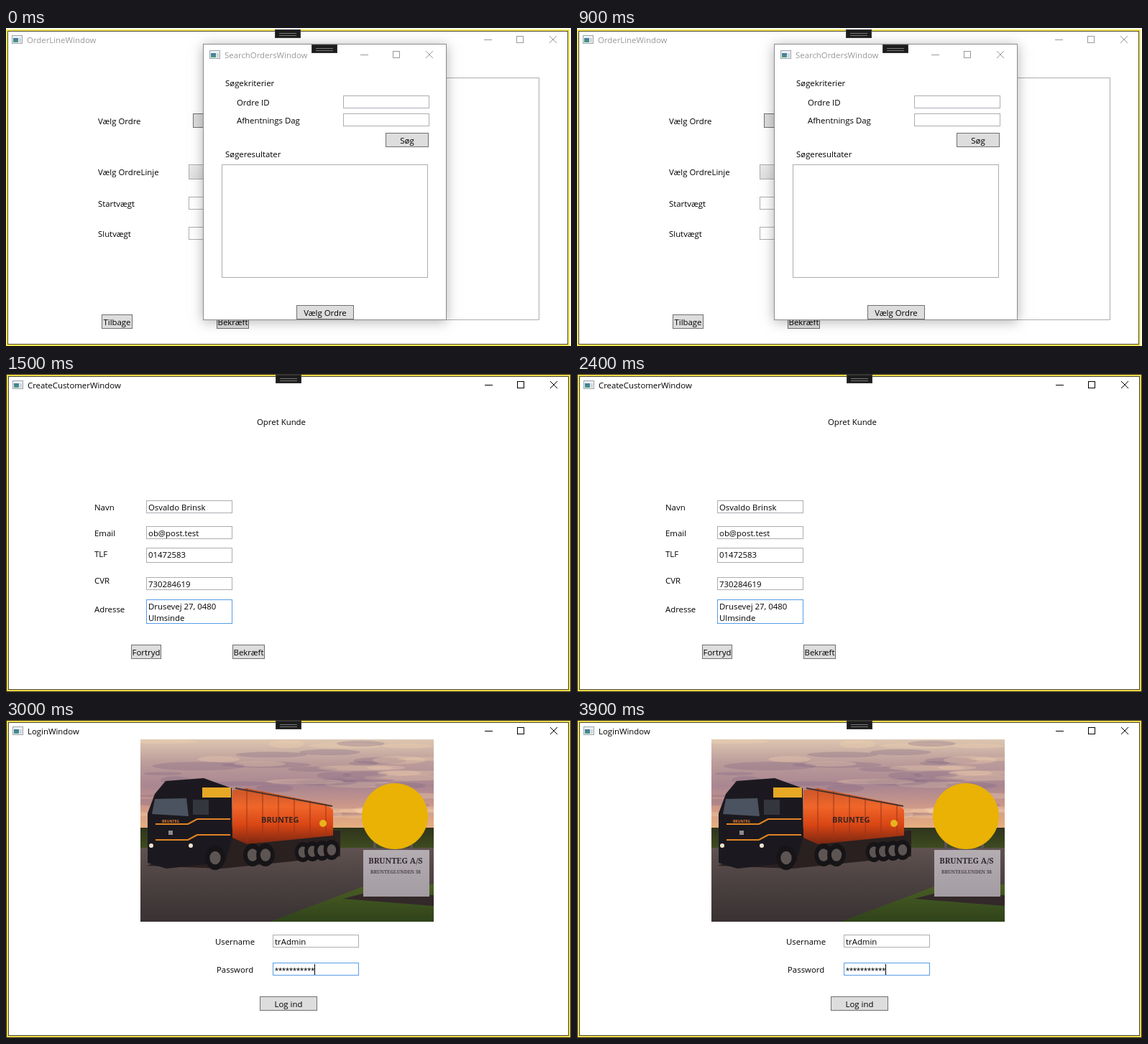
Recreate the animation shown at these times as an HTML page with a canvas. Size 786 by 443 pixels, loop 4.5 s.

```html
<!DOCTYPE html>
<html lang="da">
<head>
<meta charset="utf-8">
<title>Windows</title>
<style>
  html, body { margin: 0; overflow: hidden; background: #fff; }
  canvas { display: block; }
</style>
</head>
<body>
<canvas id="stage" width="786" height="443"></canvas>
<script>
const ctx = document.getElementById('stage').getContext('2d');
const UI_FONT = '11.4px "Open Sans", sans-serif';
const GREY = '#abadb3', BLUE = '#569de5', INACTIVE = '#999';

// Basic shapes
function rect(x, y, w, h, fill) {
  ctx.fillStyle = fill;
  ctx.fillRect(x, y, w, h);
}

function box(x, y, w, h, border = GREY, fill = '#fff') {
  rect(x, y, w, h, border);
  rect(x + 1, y + 1, w - 2, h - 2, fill);
}

function text(str, x, y, color = '#000', font = UI_FONT, align = 'left') {
  ctx.font = font;
  ctx.textAlign = align;
  ctx.fillStyle = color;
  ctx.fillText(str, x, y);
}

function poly(fill, ...points) {
  ctx.fillStyle = fill;
  ctx.beginPath();
  for (let i = 0; i < points.length; i += 2) ctx.lineTo(points[i], points[i + 1]);
  ctx.fill();
}

function line(color, x0, y0, x1, y1, width = 1) {
  ctx.strokeStyle = color;
  ctx.lineWidth = width;
  ctx.beginPath();
  ctx.moveTo(x0, y0);
  ctx.lineTo(x1, y1);
  ctx.stroke();
}

function disc(x, y, rx, fill, ry = rx) {
  ctx.fillStyle = fill;
  ctx.beginPath();
  ctx.ellipse(x, y, rx, ry, 0, 0, 7);
  ctx.fill();
}

function fade(top, bottom, ...colors) {
  const g = ctx.createLinearGradient(0, top, 0, bottom);
  colors.forEach((c, i) => g.addColorStop(i / (colors.length - 1), c));
  return g;
}

function seeded(seed) {
  return () => (seed = seed * 16807 % 2147483647) / 2147483647;
}

// Window parts
function button(label, x, y, w) {
  box(x, y, w, 20, '#707070', '#ddd');
  text(label, x + w / 2, y + 14.5, '#000', UI_FONT, 'center');
}

function field(label, labelX, x, y, value = '', { h = 18, labelDy = 14, border = GREY } = {}) {
  text(label, labelX, y + labelDy);
  box(x, y, 120, h, border);
  value.split('\n').forEach((str, i) => text(str, x + 3, y + 14 + i * 16));
}

function titleBar(title, x, y, right, color) {
  box(x, y, 15, 12, '#9aa5ad', '#eef2f4');
  rect(x + 2, y + 4, 7, 6, fade(y + 4, y + 10, '#3f77a8', '#4d9a79'));
  rect(x + 10, y + 4, 3, 6, '#cfd5d9');
  text(title, x + 21, y + 11, color);
  rect(right - 96, y + 6, 11, 1, color);
  box(right - 51, y + 1, 10, 10, color);
  line(color, right - 5, y + 1, right + 5, y + 11);
  line(color, right + 5, y + 1, right - 5, y + 11);
}

function toolTab(x, y) {
  box(x, y, 36, 12, '#3a3a3a', '#1c1c1c');
  for (const dy of [5, 8]) rect(x + 6, y + dy, 24, 1, '#777');
}

// Highlighted main window; x, y is the corner of its thin dark edge
function mainWindow(title, x, y, gold, titleColor) {
  rect(x - 2, y - 2, 784, 441, gold);
  box(x, y, 780, 437, '#4b4a3c');
  titleBar(title, x + 6, y + 6, x + 759, titleColor);
  toolTab(x + 372, y - 2);
}

function activeWindow(title) {
  rect(0, 0, 786, 443, '#333026');
  mainWindow(title, 3, 3, '#fbdd4a', '#000');
}

// Scenes
function orderScene() {
  rect(0, 0, 786, 443, '#fff');
  mainWindow('OrderLineWindow', 2, 4, '#fbe84f', INACTIVE);
  text('Vælg Ordre', 128, 134);
  button('Søg Ordre', 260, 119, 80);
  text('Vælg OrdreLinje', 128, 205);
  box(254, 190, 120, 21, '#acacac', fade(190, 211, '#eaeaea', '#dedede'));
  field('Startvægt', 128, 254, 235);
  field('Slutvægt', 128, 254, 277);
  box(420, 69, 322, 338);
  button('Tilbage', 133, 399, 43);
  button('Bekræft', 293, 399, 45);

  ctx.shadowColor = 'rgba(0, 0, 0, .3)';
  ctx.shadowBlur = 16;
  ctx.shadowOffsetY = 2;
  rect(274, 22, 339, 385, '#8c8c8c');
  ctx.shadowColor = 'transparent';
  rect(275, 23, 337, 383, '#fff');
  titleBar('SearchOrdersWindow', 283, 31, 589, INACTIVE);
  toolTab(425, 23);
  text('Søgekriterier', 305, 81);
  field('Ordre ID', 321, 469, 94);
  field('Afhentnings Dag', 321, 469, 119);
  button('Søg', 528, 146, 60);
  text('Søgeresultater', 305, 180);
  box(300, 190, 287, 158);
  button('Vælg Ordre', 404, 386, 80);
}

function customerScene() {
  activeWindow('CreateCustomerWindow');
  text('Opret Kunde', 349, 71);
  field('Navn', 123, 195, 176, 'Osvaldo Brinsk');
  field('Email', 123, 195, 212, 'ob@post.test');
  field('TLF', 123, 195, 242, '01472583', { h: 21, labelDy: 13 });
  field('CVR', 123, 195, 283, '730284619', { labelDy: 9 });
  field('Adresse', 123, 195, 314, 'Drusevej 27, 0480\nUlmsinde', { h: 34, labelDy: 18, border: BLUE });
  button('Fortryd', 174, 377, 42);
  button('Bekræft', 315, 377, 45);
}

function landscape() {
  const random = seeded(7);
  ctx.save();
  ctx.beginPath();
  ctx.rect(187, 27, 408, 254);
  ctx.clip();
  rect(187, 27, 408, 130, fade(27, 157, '#dcc6b0', '#bb9c9a', '#a98691', '#d29b88', '#ecb47c'));
  ctx.globalAlpha = .3;
  for (let i = 0; i < 50; i++) {
    const x = 187 + 408 * random(), y = 30 + 110 * random();
    disc(x, y, 20 + 45 * random(), i % 2 ? '#7d6580' : '#f4d3b0', 2 + 4 * random());
  }
  ctx.globalAlpha = 1;
  rect(187, 150, 408, 30, fade(150, 180, '#2f341c', '#3f4d20'));
  rect(187, 178, 408, 103, fade(178, 281, '#5f5250', '#4a4040', '#393132'));
  poly(fade(229, 281, '#4a5f24', '#2f431a'), 367, 281, 497, 232, 595, 229, 595, 281);
  poly('#33282a', 469, 249, 500, 241, 595, 244, 595, 259);
  ctx.restore();
}

function wheel(x, y, r) {
  disc(x, y, r * .8, '#161417', r);
  disc(x, y, r * .45, '#5d5553', r * .55);
}

function truck() {
  // Tank and chassis
  poly('#2a2020', 196, 203, 300, 160, 465, 154, 465, 190, 300, 207);
  poly(fade(95, 172, '#c9562a', '#f0662a', '#d84514', '#7d2812'),
    315, 98, 335, 95, 445, 117, 455, 125, 455, 161, 335, 173, 315, 164);
  for (let x = 335; x < 450; x += 22) line('#9d3516', x, 95 + (x - 335) * .2, x, 170 - (x - 335) * .08);
  line('#4b332c', 319, 95, 454, 120, 2);
  text('BRUNTEG', 355, 143, '#382521', 'bold 11px "Open Sans", sans-serif');
  disc(441, 144, 5, '#e8b31e');

  // Cab
  poly('#1b191f', 197, 130, 207, 103, 222, 85, 275, 81, 314, 95, 315, 163, 305, 198, 223, 207, 197, 199);
  rect(273, 94, 40, 14, '#e7a825');
  poly('#4c5360', 207, 110, 251, 109, 254, 134, 203, 131);
  rect(260, 111, 22, 21, '#34363d');
  for (const y of [145, 167]) {
    line('#e08324', 208, y, 253, y, 2);
    line('#e08324', 253, y, 266, y - 7, 2);
    line('#e08324', 266, y - 7, 312, y - 7, 2);
  }
  text('BRUNTEG', 217, 143, '#e17930', 'bold 5px "Open Sans", sans-serif');
  rect(226, 154, 6, 6, '#8d8b8c');
  for (const x of [202, 257]) disc(x, 175, 3, '#eee4d0');

  wheel(291, 192, 17);
  for (let i = 0; i < 2; i++) wheel(343 + i * 18, 188, 16);
  for (let i = 0; i < 4; i++) wheel(413 + i * 13.3, 184 - i, 14);
}

function roadSign() {
  for (const x of [511, 562]) rect(x, 168, 4, 18, '#59505a');
  disc(541, 134, 46, '#e9b204');
  rect(497, 181, 92, 65, fade(181, 246, '#b3acb1', '#a39ca2'));
  text('BRUNTEG A/S', 542, 200, '#302a30', 'bold 11px "Noto Serif", serif', 'center');
  text('BRUNTEGLUNDEN 38', 542, 214, '#4a434a', 'bold 6.5px "Noto Serif", serif', 'center');
}

function loginScene() {
  activeWindow('LoginWindow');
  landscape();
  truck();
  roadSign();
  field('Username', 291, 371, 299, 'trAdmin');
  field('Password', 293, 371, 338, '', { border: BLUE });
  text('*'.repeat(11), 374, 354, '#000', '12.9px "Liberation Sans", sans-serif');
  rect(429, 340, 1, 15, '#000');
  button('Log ind', 353, 385, 80);
}

const scenes = [orderScene, customerScene, loginScene];
const start = performance.now();
let shown = -1;

function tick() {
  const index = Math.floor((performance.now() - start) / 1500) % scenes.length;
  if (index !== shown) scenes[shown = index]();
  requestAnimationFrame(tick);
}
tick();
</script>
</body>
</html>
```
